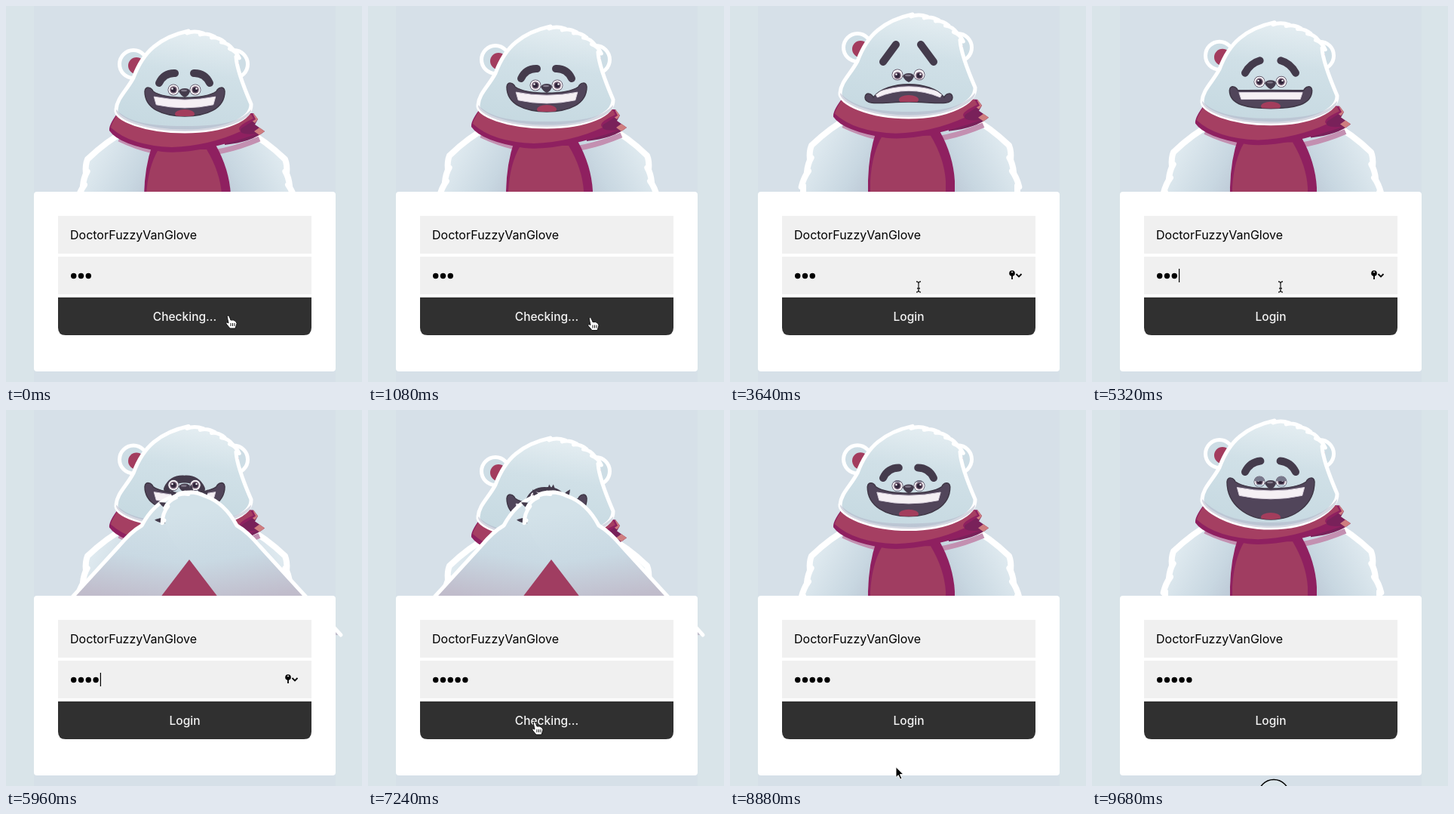
Animation, 472 px wide and 498 px high, one loop 9.72 s. Source, as an HTML page:

```html
<!DOCTYPE html>
<html lang="en">
<head>
<meta charset="utf-8">
<title>Bear login</title>
<style>
  html, body { margin: 0; width: 100%; height: 100%; overflow: hidden; background: #d9e4e9; }
  svg { display: block; width: 472px; height: 498px; }
  text { font: 16px Inter, Roboto, sans-serif; }
  .button { font-size: 15.5px; font-weight: 500; fill: #f4f4f4; text-anchor: middle; }
  .ink { fill: #443b4c; }
  .brow { fill: none; stroke: #443b4c; stroke-width: 10; stroke-linecap: round; }
  .edge { fill: none; stroke: #fff; stroke-width: 5; stroke-linejoin: round; stroke-linecap: round; }
  .wide { stroke-width: 8; }
</style>
</head>
<body>
<svg viewBox="0 0 472 498">
  <defs>
    <linearGradient id="headFill" x1=".6" y1="0" x2=".4" y2="1">
      <stop offset="0" stop-color="#e5eef2"/><stop offset=".4" stop-color="#d0e0e7"/><stop offset="1" stop-color="#c6d9e1"/>
    </linearGradient>
    <linearGradient id="bodyFill" x1="0" y1="0" x2="1" y2=".5">
      <stop offset=".15" stop-color="#e3edf2"/><stop offset=".6" stop-color="#c8d7e1"/><stop offset="1" stop-color="#b0b8c9"/>
    </linearGradient>
    <linearGradient id="armFill" x1=".7" y1="0" x2=".5" y2="1">
      <stop offset=".1" stop-color="#d3e2e9"/><stop offset=".45" stop-color="#c9d9e3"/><stop offset=".75" stop-color="#c0bccb"/>
    </linearGradient>
    <clipPath id="mouthClip"><path class="mouth"/></clipPath>
    <clipPath id="eyeClip"><circle r="7"/></clipPath>
  </defs>

  <path fill="#d6e0e8" d="M37 0H437V498H37z"/>

  <g id="torso">
    <g id="shoulders"></g>
    <path fill="none" stroke="#c390b1" stroke-width="7" d="M150 176Q237 218 336 176"/>
    <path fill="#8f2060" d="M194 184H278Q296 216 298 250V300H183V250Q184 212 194 184z"/>
    <path fill="#a03d61" d="M202 190H266Q284 220 286 250V300H186V250Q188 214 202 190z"/>
    <path fill="#79215a" d="M290 160L328 142L334 150L330 157L343 166Q326 180 290 184z"/>
    <path fill="#ce7d7f" d="M328 142L334 150L330 155L322 149zM336 161L343 166L336 171L329 166z"/>
    <path fill="#8f2060" d="M147 143Q136 158 137 165Q150 184 207 193Q250 198 334 169Q306 172 312 162L331 150L327 142z"/>
    <path fill="#a53f62" d="M148 143Q139 157 139 161Q165 185 220 187Q270 185 311 166Q303 160 328 149L324 142z"/>
  </g>

  <g id="head">
    <g id="ears"></g>
    <path id="skull" class="edge" style="fill: url(#headFill)"/>
    <path id="chin" fill="#b2b7c9" opacity=".55"/>
    <g id="brows"></g>
    <path class="mouth" fill="#51455a" stroke="#3f3746" stroke-width="1.5"/>
    <g clip-path="url(#mouthClip)">
      <ellipse id="tongue" cx="237" rx="13" ry="6" fill="#a33d5c"/>
      <path id="teeth" fill="#f5f0f4" stroke="#d9d1dd"/>
    </g>
    <g id="eyes"></g>
    <g id="nose">
      <path class="ink" d="M229 113Q231 109 237 109Q243 109 244 113Q243 118 237 121Q231 118 229 113z"/>
      <ellipse cx="236" cy="112" rx="4" ry="1.2" fill="#81798a"/>
    </g>
  </g>

  <g id="armBack"></g>
  <g id="armFront"></g>

  <rect x="37" y="246" width="400" height="238" rx="4" fill="#fff"/>
  <path fill="#f0f0f0" d="M69 278H405V328H69zM69 332H405V382H69z"/>
  <path fill="#303030" d="M69 386H405V426Q405 436 395 436H79Q69 436 69 426z"/>
  <text x="85" y="309">DoctorFuzzyVanGlove</text>
  <text id="label" class="button" x="237" y="417"></text>
  <g id="dots"></g>
  <path id="caret" d="M0 348h1.2v18h-1.2z"/>
  <g id="key">
    <circle cx="374" cy="354" r="3.8"/>
    <circle cx="374" cy="352.4" r="1" fill="#f0f0f0"/>
    <path d="M374 356V362M379.500 355l3.500 3.500 3.500-3.500" fill="none" stroke="#000" stroke-width="1.8"/>
  </g>
  <circle id="ring" cx="241" cy="510" r="20.500" fill="#dce6eb" stroke="#000" stroke-width="1.5"/>
  <g id="hand">
    <path fill="#fff" stroke="#111" d="M-5-7q2-2 3 0l2 5q4-1 7 2q2 2 0 6l-1 3h-7l-5-6q-1-3 1-2l2 1z"/>
    <path fill="none" stroke="#111" d="M0 2v4M2.500 2v4M5 2v4"/>
  </g>
  <path id="beam" fill="none" stroke="#222" stroke-width="1.3" d="M-3-7q3 0 3 3V4q0 3-3 3M3-7q-3 0-3 3M3 7q-3 0-3-3M-2 2h4"/>
  <path id="arrow" stroke="#fff" d="M0-8V6l3.200-3 2.500 5.500 2.300-1L5.500 2H10z"/>
</svg>

<script>
const LOOP = 9720;
const CENTER = 237;
const $ = id => document.getElementById(id);
const setAll = (selector, name, value) =>
  document.querySelectorAll(selector).forEach(el => el.setAttribute(name, value));
const show = (id, on) => { $(id).style.display = on ? '' : 'none'; };
const move = (selector, x, y) => setAll(selector, 'transform', `translate(${x} ${y})`);
const mirror = (markup, axis) => `<g transform="translate(${2 * axis}) scale(-1 1)">${markup}</g>`;
const both = (markup, axis) => markup + mirror(markup, axis);

const linear = (t, start, length) => Math.min(1, Math.max(0, (t - start) / length));
const ramp = (t, start, length) => {
  const k = linear(t, start, length);
  return k * k * (3 - 2 * k);
};
const bump = (t, start, length) => Math.sin(Math.PI * linear(t, start, length));

// Points along a quadratic curve, each with its direction and outward normal.
function along([ax, ay], [bx, by], [cx, cy], count) {
  return Array.from({ length: count + 1 }, (_, i) => {
    const k = i / count, j = 1 - k;
    const dx = j * (bx - ax) + k * (cx - bx), dy = j * (by - ay) + k * (cy - by);
    const len = Math.hypot(dx, dy);
    return { x: j * j * ax + 2 * j * k * bx + k * k * cx, y: j * j * ay + 2 * j * k * by + k * k * cy,
      dx: dx / len, dy: dy / len, nx: dy / len, ny: -dx / len };
  });
}

// Scalloped fur: every lock bulges outwards and ends in a small tip.
function tufts(points, size) {
  const lean = Math.abs(size) * .8;
  return points.slice(1).map((p, i) => {
    const q = points[i];
    const bulge = `Q${(p.x + q.x) / 2 + p.nx * size} ${(p.y + q.y) / 2 + p.ny * size}`;
    return `${bulge} ${p.x + p.dx * lean + p.nx * size * .5} ${p.y + p.dy * lean + p.ny * size * .5}L${p.x} ${p.y}`;
  }).join('');
}

const crown = tufts(along([240, 36], [286, 38], [305, 67], 5), 5);

function build() {
  const shoulder = `M160 165Q134 178 108 203${tufts(along([108, 203], [110, 226], [97, 256], 3), -3)}V300`;
  $('shoulders').innerHTML = both(
    `<path fill="url(#bodyFill)" d="${shoulder}H240V165z"/><path class="edge wide" d="${shoulder}"/>`, 239);

  const knuckles = along([222, 114], [272, 102], [276, 146], 4);
  const outer = `M42 298L150 180Q166 161 180 153Q196 123 222 114${tufts(knuckles, 5)}`;
  const claws = knuckles.slice(1).map(p =>
    `<path class="ink" d="M-4 4Q-4-5 1-13Q5-5 4 4z"
      transform="translate(${p.x} ${p.y}) rotate(${Math.atan2(p.ny, p.nx) * 180 / Math.PI + 90})"/>`).join('');
  const arm = `${claws}<path fill="url(#armFill)" d="${outer}Q268 178 243 198L165 300z"/><path class="edge" d="${outer}"/>`;
  $('armBack').innerHTML = arm;
  $('armFront').innerHTML = mirror(arm, 243);

  $('ears').innerHTML = both(`<circle class="edge" style="fill: #cddde5" cx="169" cy="77" r="18.500"/>
    <circle cx="173" cy="79" r="11" fill="#a33c5e"/>`, 235.5);
  $('brows').innerHTML = both('<path class="brow"/>', 236.5);
  $('eyes').innerHTML = both(`<g transform="translate(222 111)">
    <circle r="7.500" fill="#5c5065"/>
    <g clip-path="url(#eyeClip)">
      <circle r="6.800" fill="#f7f5f7"/>
      <g class="pupil"><circle r="4.800" fill="#796076"/><circle r="3.300" fill="#30253a"/>
        <circle cx="-1.500" cy="-1.500" r="1.200" fill="#fff"/></g>
      <path class="upperLid" d="M-8-21H8V-7H-8z" fill="#77788b"/>
      <path class="lowerLid" d="M-8 7H8V18H-8z" fill="#b6c8d3"/>
    </g></g>`, 236.5);
  $('dots').innerHTML = [0, 1, 2, 3, 4].map(i => `<circle cx="${89.700 + i * 9.8}" cy="357.500" r="3.700"/>`).join('');
}

function drawMouth(sad, laugh) {
  const blend = (grin, frown, wide) => grin + (frown - grin) * sad + (wide - grin) * laugh;
  const half = blend(53, 58, 58), corner = blend(113, 143, 114);
  const top = blend(124, 120, 126), bottom = blend(146, 149, 164);
  const left = CENTER - half, right = CENTER + half;
  const cheek = corner + 10 + (bottom - corner) * .4;
  setAll('.mouth', 'd', `M${left} ${corner}C${left + 1} ${corner - 8} ${left + 9} ${corner - 5} ${left + 11} ${corner}
    C${CENTER - half / 2} ${top} ${CENTER + half / 2} ${top} ${right - 11} ${corner}
    C${right - 9} ${corner - 5} ${right - 1} ${corner - 8} ${right} ${corner}
    C${right} ${cheek} ${CENTER + half * .55} ${bottom} ${CENTER} ${bottom}
    C${CENTER - half * .55} ${bottom} ${left} ${cheek} ${left} ${corner}Z`);

  // The teeth follow the upper lip with half of its sag.
  const sag = (top - corner) * .75, bite = half * .77;
  const side = corner + sag / 2 + 3, height = 9 + sag * .2;
  $('teeth').setAttribute('d', `M${CENTER - bite} ${side}Q${CENTER} ${side + sag} ${CENTER + bite} ${side}
    l-3 ${height}Q${CENTER} ${side + sag + height} ${CENTER - bite + 3} ${side + height}Z`);
  $('tongue').setAttribute('cy', bottom - 3);
}

function drawHead(chin) {
  const jaw = `C326 150 290 ${chin} 237 ${chin}C184 ${chin} 144 150 146 137`;
  $('skull').setAttribute('d', `M146 137C147 122 160 112 169 95Q179 68 196 54Q214 39 242 33L240 36${crown}
    Q306 86 325 130${jaw}Z`);
  $('chin').setAttribute('d', `M325 137${jaw}C160 152 184 ${chin - 7} 237 ${chin - 7}C290 ${chin - 7} 312 152 325 137Z`);
}

function drawBear(t) {
  const sad = ramp(t, 1400, 260) - ramp(t, 5040, 460);
  const laugh = ramp(t, 8760, 300);
  const cover = ramp(t, 5400, 440) - ramp(t, 7340, 360);
  const breath = 3 * (Math.cos(2 * Math.PI * t / 2160) - 1);
  const leap = 7 * bump(t, 1400, 500) + 7 * bump(t, 8760, 560) + 16 * bump(t, 5760, 480);
  const lift = breath * (1 - Math.max(sad, laugh, cover)) - 22 * sad - 19 * laugh + 4 * cover - leap;
  move('#head', 0, lift);
  move('#torso', 0, lift * .83);
  drawHead(166 + 3 * sad + 9 * laugh);
  drawMouth(sad, laugh);

  const slant = sad + laugh * .15, bow = 7 * (1 - slant);
  const inner = [224 - 4 * slant, 89 - 16 * slant], outer = [203, 102 - 6 * slant];
  setAll('.brow', 'd', `M${outer}Q${(inner[0] + outer[0]) / 2 - bow * .6} ${(inner[1] + outer[1]) / 2 - bow} ${inner}`);
  move('.brow', 11 * cover, 14 * cover);

  move('#eyes, #nose', 0, 2 * sad + 3 * laugh);
  move('.pupil', 0, ramp(t, 3040, 240) - ramp(t, 5040, 280));
  const lid = .4 * bump(t, 8080, 480) + .45 * laugh;
  move('.upperLid', 0, lid * 14);
  move('.lowerLid', 0, -lid * 7);

  const swing = 62 * Math.sin(Math.PI * cover), drop = 170 * (1 - cover);
  move('#armBack', -swing, drop);
  move('#armFront', swing, drop);
  show('armBack', cover > 0);
  show('armFront', cover > 0);
}

function drawForm(t) {
  const count = 3 + (t >= 5760) + (t >= 6080);
  [...$('dots').children].forEach((dot, i) => { dot.style.display = i < count ? '' : 'none'; });
  const focused = t >= 3160 && t < 6960;
  show('caret', focused && (t >= 5040 || Math.floor((t - 3160) / 470) % 2 === 0));
  move('#caret', 115 + (count - 3) * 9.8, 0);
  show('key', focused);
  $('label').textContent = t < 1400 || (t >= 6960 && t < 8800) ? 'Checking...' : 'Login';
}

function drawPointer(t) {
  const toField = ramp(t, 2400, 880), toButton = ramp(t, 6720, 240);
  const x = 298 - 48 * toField - 26 * toButton - 4 * ramp(t, 7400, 900);
  const y = 418 + 6 * ramp(t, 400, 1500) - 52 * toField + 49 * toButton
    + 46 * ramp(t, 7400, 900) + 45 * ramp(t, 8720, 440);
  const typing = t > 5560 && t < 6720;
  const shape = typing || t > 9160 ? '' : y < 386 ? 'beam' : y > 437 ? 'arrow' : 'hand';
  for (const id of ['hand', 'beam', 'arrow']) {
    show(id, id === shape);
    move('#' + id, x, y);
  }
  show('ring', t >= 9440);
}

build();
const start = performance.now();
function tick() {
  const t = (performance.now() - start) % LOOP;
  drawBear(t);
  drawForm(t);
  drawPointer(t);
  requestAnimationFrame(tick);
}
tick();
</script>
</body>
</html>
```
